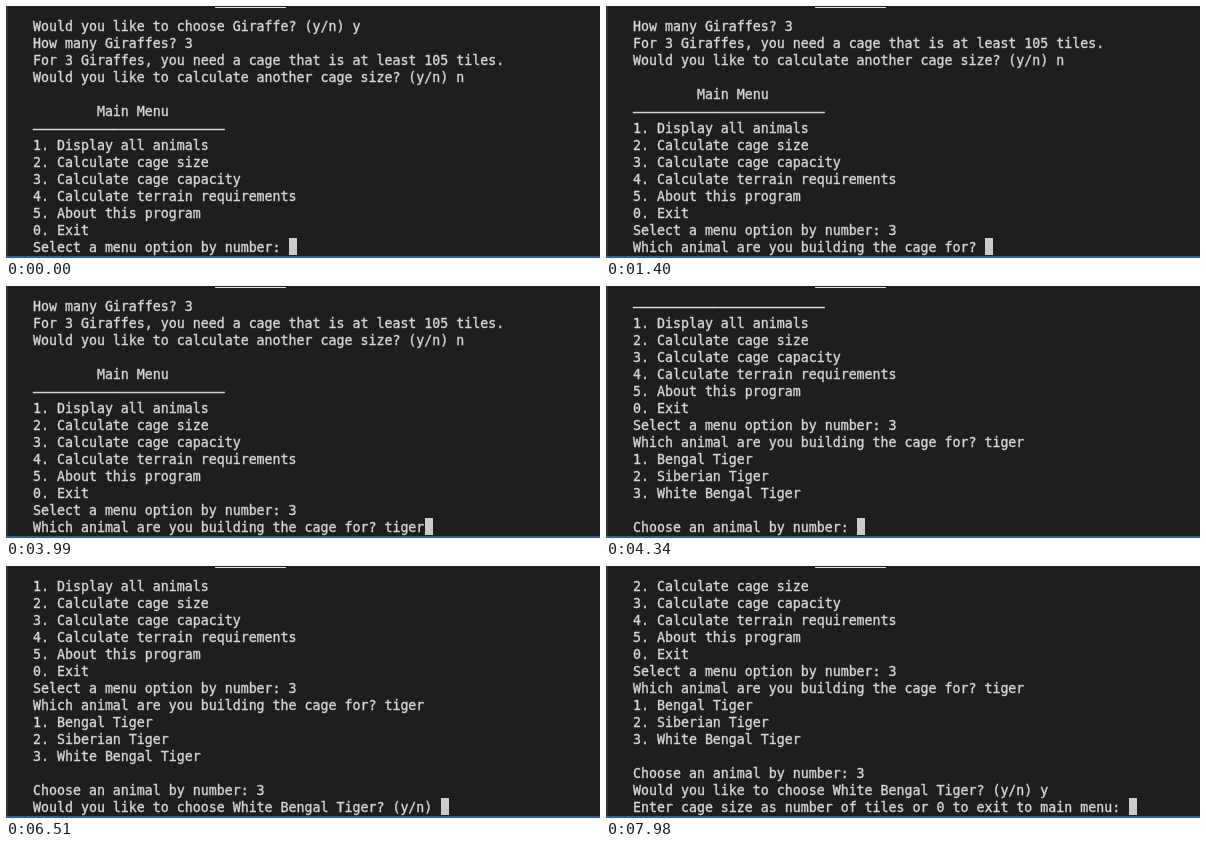
These frames come from a looping animation (594x252 px, 8000 ms). An HTML page:

```html
<!DOCTYPE html>
<html lang="en">
<head>
<meta charset="utf-8">
<title>Terminal menu</title>
<style>
  html, body { margin: 0; width: 100%; height: 100%; overflow: hidden; background: #1e1e1e; }
  #stage { position: relative; width: 594px; height: 252px; overflow: hidden; background: #1e1e1e; }
  #stage > * { position: absolute; margin: 0; }
  #screen {
    left: 27px; top: 12px; color: #d6d6d6; white-space: pre;
    font: 13.288px/17px "DejaVu Sans Mono", monospace;
    font-variant-ligatures: none;
    -webkit-text-stroke: .35px #d6d6d6;
  }
  #cursor { top: 232px; width: 8px; height: 17px; background: #cbcbcb; }
  .tab { left: 209px; top: 1px; width: 71px; height: 1px; background: #e4e4e4; }
  .side { left: 0; top: 0; width: 2px; height: 250px; background: #343536; }
  .edge { left: 0; top: 250px; width: 594px; height: 2px; background: #2b619c; }
</style>
</head>
<body>
<div id="stage">
  <div class="tab"></div>
  <div class="side"></div>
  <div class="edge"></div>
  <div id="cursor"></div>
  <pre id="screen"></pre>
</div>
<script>
const LOOP = 8000, ROWS = 14, CELL = 8, LEFT = 27;

const history = `Would you like to choose Giraffe? (y/n) y
How many Giraffes? 3
For 3 Giraffes, you need a cage that is at least 105 tiles.
Would you like to calculate another cage size? (y/n) n

        Main Menu
${"—".repeat(24)}
1. Display all animals
2. Calculate cage size
3. Calculate cage capacity
4. Calculate terrain requirements
5. About this program
0. Exit
Select a menu option by number: `;

// Each entry appends text to the terminal at its time in ms.
const output = [
  [0, history],
  [350, "3"],
  [1400, "\nWhich animal are you building the cage for? "],
  [3290, "t"], [3570, "i"], [3710, "g"], [3920, "e"], [3990, "r"],
  [4340, "\n1. Bengal Tiger\n2. Siberian Tiger\n3. White Bengal Tiger\n\nChoose an animal by number: "],
  [6090, "3"],
  [6510, "\nWould you like to choose White Bengal Tiger? (y/n) "],
  [7490, "y"],
  [7980, "\nEnter cage size as number of tiles or 0 to exit to main menu: "]
];

const screenEl = document.getElementById("screen");
const cursorEl = document.getElementById("cursor");
let shown = -1;

function render(time) {
  const count = output.filter(([at]) => at <= time).length;
  if (count === shown) return;
  shown = count;
  const text = output.slice(0, count).map(([, part]) => part).join("");
  const lines = text.split("\n").slice(-ROWS);
  screenEl.textContent = lines.join("\n");
  cursorEl.style.left = LEFT + lines[ROWS - 1].length * CELL + "px";
}

function tick() {
  render(performance.now() % LOOP);
  requestAnimationFrame(tick);
}
tick();
</script>
</body>
</html>
```
